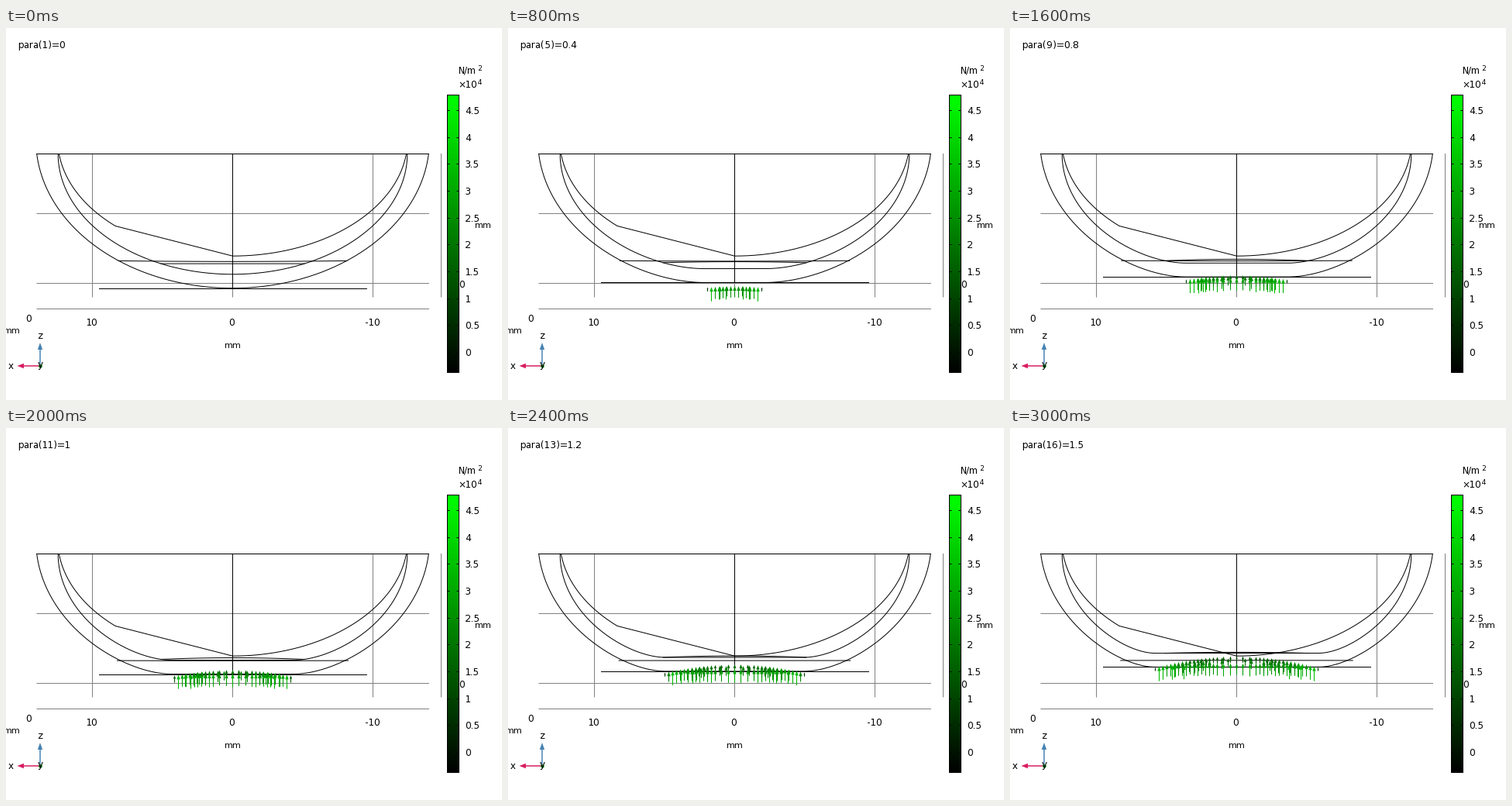
Recreate the animation shown at these times as a matplotlib script. Size 640 by 480 pixels, loop 3.2 s.

```python
import numpy as np
import matplotlib.pyplot as plt
from matplotlib.animation import FuncAnimation
from matplotlib.collections import LineCollection, PolyCollection
from matplotlib.colors import LinearSegmentedColormap

W, H, DPI = 640, 480, 100
PX = 72 / DPI            # points per pixel
MM = 18.14               # pixels per millimetre
CX, TOP, FLOOR = 292.5, 162.5, 335.7
STEPS, INTERVAL = 16, 200

# whole-pixel glyph advances
plt.rcParams.update({"font.family": "DejaVu Sans", "text.hinting_factor": 1})
fig = plt.figure(figsize=(W / DPI, H / DPI), dpi=DPI, facecolor="white")
ax = fig.add_axes([0, 0, 1, 1])
ax.axis("off")


def line(xs, ys, color="black", z=3, snap=False):
    return ax.plot(xs, ys, color=color, lw=PX, zorder=z, snap=snap)[0]


def label(x, y, s, size=12, ha="left"):
    return ax.text(x, y, s, fontsize=size * PX, ha=ha, va="baseline", zorder=9)


def bowl(x, half, depth, lift):
    """Depth of an elliptic arc whose centre lies `lift` above the rim."""
    b = depth + lift
    a = half / np.sqrt(1 - (lift / b) ** 2)
    return b * np.sqrt(np.clip(1 - (x / a) ** 2, 0, 1)) - lift


def pressed(x, half, depth, lift, p):
    """Arc flattened from below by p mm, easing out beyond the contact."""
    y = bowl(x, half, depth, lift)
    if p == 0:
        return TOP + y
    flat = depth - MM * p
    c = 77.5 * p ** 0.75
    gap = bowl(c, half, depth, lift) - flat
    slope = bowl(c + 0.5, half, depth, lift) - bowl(c - 0.5, half, depth, lift)
    r = np.abs(x)
    tail = y - gap * np.exp(np.minimum(slope / gap * (r - c), 0))
    return TOP + np.where(r < c, flat, tail)


def build_colorbar():
    cmap = LinearSegmentedColormap.from_list("load", ["black", "lime"])
    ax.imshow(np.linspace(1, 0, 256)[:, None], cmap=cmap, aspect="auto",
              extent=(569, 585, 445, 86), zorder=4)
    line([569.5, 584.5, 584.5, 569.5, 569.5], [86.5, 86.5, 444.5, 444.5, 86.5], z=5)
    for i in range(10):
        y = np.floor(418.5 - 34.67 * i) + 0.5
        line([569.5, 572], [y, y], z=5)
        line([582, 584.5], [y, y], z=5)
        label(592, y + 4.4, f"{i / 2:g}")
    label(583.4, 59, "N/m")
    label(608.4, 55, "2", 9)
    label(583.4, 77, "×10")
    label(609.4, 73, "4", 9)


def build_axes():
    for x in (111.5, CX, 473.5, 561.5):
        line([x, x], [TOP, 347], "#808080", 1)
    for y in (239.5, 329.5, 362.5):
        line([40, 545.5], [y, y], "#808080", 1)
    for x, s in ((110.4, "10"), (291.2, "0"), (473.4, "-10")):
        label(x, 384, s, ha="center")
    label(29.4, 379, "0", ha="center")
    label(588.4, 335, "0", ha="center")
    for x, y in ((292, 413), (615, 258), (6.9, 394)):
        label(x, y, "mm", 11, "center")


def build_triad():
    blue, pink = "#4682b4", "#d81b60"
    ax.plot([44, 44], [436, 412], color=blue, lw=1.5 * PX, zorder=4)
    ax.plot([44, 20], [436, 436], color=pink, lw=1.5 * PX, zorder=4)
    ax.fill([44, 40.8, 47.2], [406, 415, 415], color=blue, lw=0, zorder=5)
    ax.fill([14.5, 23, 23], [436, 432.8, 439.2], color=pink, lw=0, zorder=5)
    ax.plot([44], [436], "o", ms=4.5 * PX, color="#0a8a0a", mew=0, zorder=5)
    label(44, 401, "z", ha="center")
    label(6.3, 439.5, "x", ha="center")
    label(44.3, 438.4, "y", ha="center")


build_colorbar()
build_axes()
build_triad()

OUTER = (252.8, FLOOR - TOP, 18)
MIDDLE = (225.3, 155.3, 0)
INNER = (224, 131.7, 18)


def span(half):
    return half * np.sin(np.linspace(-np.pi / 2, np.pi / 2, 241))


# Fixed outline
xo, xm, xi = (span(s[0]) for s in (OUTER, MIDDLE, INNER))
xi = np.concatenate([xi[xi < -151.5], [-151.5], xi[xi >= 0]])
line(CX + xo[[0, -1]], [TOP, TOP])
line(CX + xi, TOP + bowl(xi, *INNER))

# Moving outline
outer, middle, stem, upper, lower = (line([], []) for _ in range(5))
plate = line([], [], snap=True)
title = label(15, 26, "")
shafts = ax.add_collection(
    LineCollection([], linewidths=1.1 * PX, zorder=6, snap=False))
heads = ax.add_collection(PolyCollection([], linewidths=0, zorder=7))
ax.set_xlim(0, W)
ax.set_ylim(H, 0)

rng = np.random.default_rng(4)
SPOTS = np.column_stack([rng.uniform(5, 85, 22), rng.uniform(0.2, 0.65, 22)])


def load_points(p):
    """(x offset, radius) of every load arrow, and the contact rim."""
    rim = 77 * p ** 0.75 - 20 * max(0, 0.58 - p)
    cols = 5.0 * np.arange(23)
    if p > 0.7:
        cols = np.concatenate([8.4 * np.arange(3), cols[5:]])
    pts = []
    for x in cols[cols <= rim + 2]:
        pts.append((x, x))
        if p > 0.7 and x < 0.7 * rim:
            pts.append((x, 0.8 * rim))
    for x, depth in SPOTS:
        r = np.hypot(x, depth * rim)
        if r < 0.9 * rim:
            pts.append((x, r))
    pts += [(-x, r) for x, r in pts if x > 0]
    return pts, rim


def draw_arrows(p):
    pts, rim = load_points(p) if p else ([], 1)
    segs, tris, cols = [], [], []
    for x, r in sorted(pts, key=lambda q: -q[1]):
        base = 16 - 5.3 * p
        size = base + (20 - base) * min(r / rim, 1) ** 2
        size += 1.3 * np.sin(2.1 * abs(x) + 7 * p)
        size *= np.clip((rim - r) / 4.5, 0.25, 1)
        tip = 347 - 35 * p + 0.0013 * r * r
        px = np.floor(CX + x) + 0.5
        w, h = min(2.2, 0.18 * size), min(6, 0.45 * size)
        segs.append([(px, tip + h * 0.8), (px, tip + size)])
        tris.append([(px, tip), (px - w, tip + h), (px + w, tip + h)])
        cols.append((0, min(size * 10 / 255, 0.85), 0))
    shafts.set_segments(segs)
    shafts.set_color(cols or "none")
    heads.set_verts(tris)
    heads.set_facecolor(cols or "none")


def update(k):
    p = round(k / 10, 1)
    base = FLOOR - MM * p
    title.set_text(f"para({k + 1})={p:g}")
    outer.set_data(CX + xo, pressed(xo, *OUTER, p))
    middle.set_data(CX + xm, pressed(xm, *MIDDLE, p))
    plate.set_data([120, 465], [base, base])
    stem.set_data([CX, CX], [TOP, base])

    t = np.linspace(-1, 1, 41)
    arch = 1 - t ** 2
    upper.set_data(CX + (147.5 + 1.5 * p) * t, 300.4 - 0.3 * p + (0.9 - 0.7 * p) * arch)
    end = pressed(np.array([92.5]), *MIDDLE, p)[0]
    lower.set_data(CX + 92.5 * t, end - 2 * np.sin(np.pi * p / 1.9) * arch)

    draw_arrows(p)
    return outer, middle, plate, stem, upper, lower, title, shafts, heads


anim = FuncAnimation(fig, update, frames=STEPS, interval=INTERVAL,
                     repeat=True, repeat_delay=0, blit=False)
plt.show()
```
